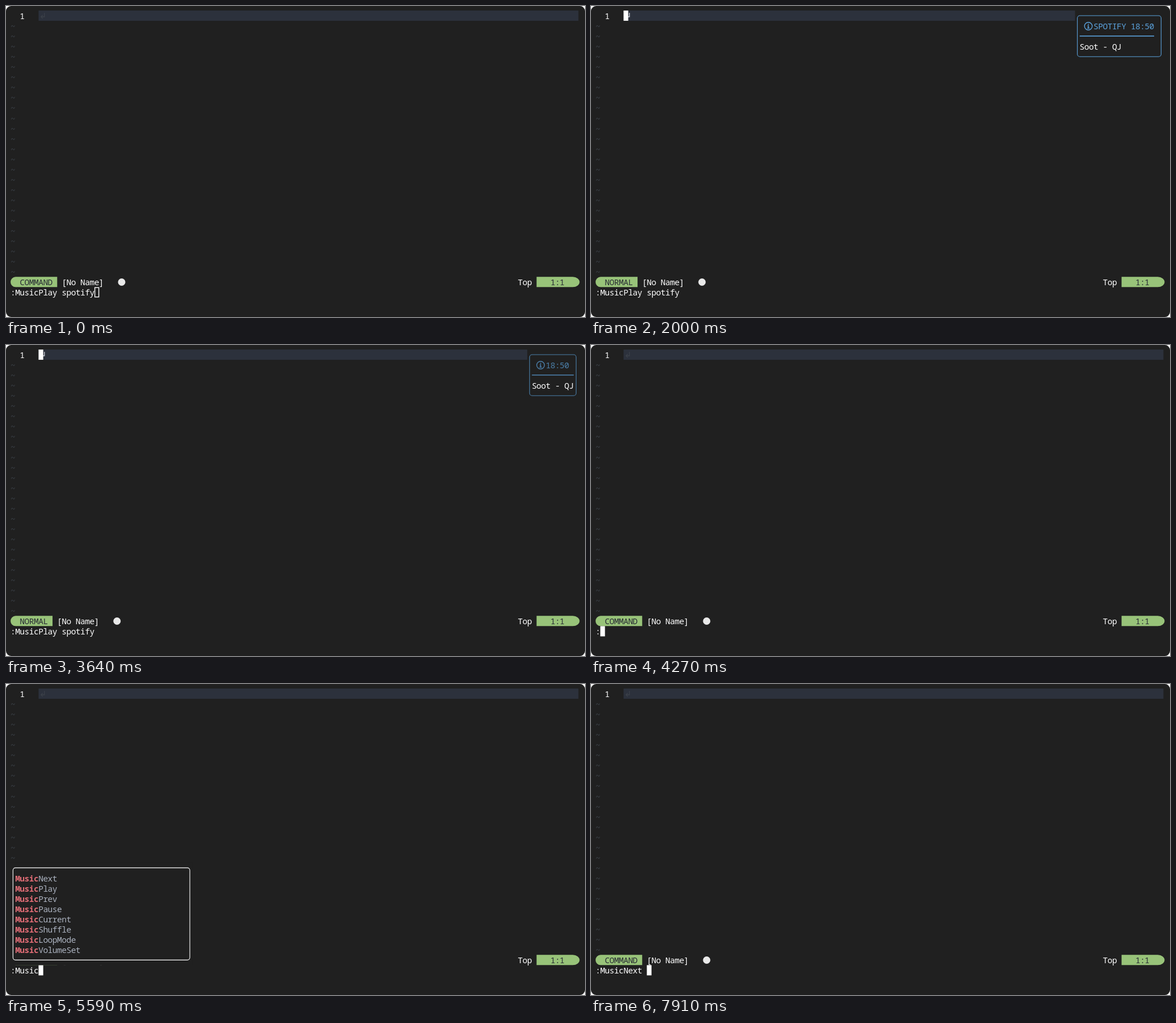
Write an HTML page that moves like this. It is 1021 px wide and 548 px high and loops after 8 s.

```html
<!DOCTYPE html>
<html lang="en">
<head>
<meta charset="utf-8">
<title>Editor music commands</title>
<style>
html, body { margin: 0; width: 100%; height: 100%; overflow: hidden; background: #fff; }
svg { display: block; width: 1021px; height: 548px; }
text { font: 14.5px "Noto Sans Mono", "DejaVu Sans Mono", monospace; letter-spacing: -.493px; white-space: pre; }
.bold { font-weight: 700; }
</style>
</head>
<body>
<svg id="screen" viewBox="0 0 1021 548"></svg>
<script>
const LOOP = 8000, CELL = 8.207, LINE = 18.05, COLS = 122;
const BG = '#202020', WHITE = '#fff', GREEN = '#98c379', BLUE = '#61afef';
const RED = '#e06c75', GREY = '#abb2bf', DIM = '#3b4048', CURSORLINE = '#2c313c';
const screen = document.getElementById('screen');

const X = col => 8.2 + col * CELL;
const Y = row => 8 + row * LINE;
const midX = col => X(col) + CELL / 2;
const midY = row => Y(row) + LINE / 2;

const text = (col, row, str, fill = WHITE, cls = '') =>
  `<text x="${X(col) - .25}" y="${Y(row) + 15}" fill="${fill}" class="${cls}">${str}</text>`;
const rect = (x, y, w, h, fill) =>
  `<rect x="${x}" y="${y}" width="${w}" height="${h}" fill="${fill}"/>`;
const cells = (col, row, w, h, fill) => rect(X(col), Y(row), w * CELL, h * LINE, fill);
const frame = (c0, r0, c1, r1, stroke) =>
  `<rect x="${midX(c0)}" y="${midY(r0)}" width="${(c1 - c0) * CELL}" height="${(r1 - r0) * LINE}"
    rx="4.5" fill="none" stroke="${stroke}" stroke-width="1.1"/>`;

// Remaining distance of a critically damped spring
const spring = (ms, omega) => {
  const z = Math.max(0, ms) / 1000 * omega;
  return (1 + z) * Math.exp(-z);
};

const MUSIC = ['MusicNext', 'MusicPlay', 'MusicPrev', 'MusicPause', 'MusicCurrent',
  'MusicShuffle', 'MusicLoopMode', 'MusicVolumeSet'];
const ALL = ['Man', 'Mason', 'MasonLog', 'MusicNext', 'MusicPlay', 'MusicPrev',
  'MatchDebug', 'MusicPause', 'MasonInstall', 'MusicCurrent'];
const PAIR = ['MusicNext', 'MusicCurrent'], SINGLE = ['MusicNext'];
const RIGHT_EDGE = { 10: 39, 8: 38, 2: 34, 1: 31 };

// start in ms, command line, completion list
const STEPS = [
  [0, 'MusicPlay spotify'],
  [4180, ''],
  [5090, 'M', ALL],
  [5320, 'Mu', MUSIC],
  [5410, 'Mus', MUSIC],
  [5500, 'Musi', MUSIC],
  [5590, 'Music', MUSIC],
  [6950, 'MusicN', PAIR],
  [7180, 'MusicNe', SINGLE],
  [7400, 'MusicNex', SINGLE],
  [7630, 'MusicNext', SINGLE],
  [7770, 'MusicNext ', SINGLE],
  [7820, 'MusicNext ']
];

function bufferLine(end, focused) {
  const x = X(6);
  return cells(6, 0, end - 6, 1, CURSORLINE) + text(2, 0, '1') +
    `<path d="M${x + 10.3} 12v7h-6m3-3l-3 3l3 3" fill="none" stroke="${focused ? '#c8ccd4' : DIM}" stroke-width="1.4"/>` +
    (focused ? cells(6, 0, 1, 1, WHITE) : '');
}

function statusLine(mode) {
  const end = mode.length + 3, y = Y(26), r = LINE / 2;
  const right = X(COLS) + 2;
  return `<path d="M${X(end)} ${y}H${8 + r}a${r} ${r} 0 0 0 0 ${LINE}H${X(end)}z
      M${X(113)} ${y}H${right - r - 3}a${r + 3} ${r} 0 0 1 0 ${LINE}H${X(113)}z" fill="${GREEN}"/>` +
    text(2, 26, mode, '#282c34') + text(end + 1, 26, '[No Name]') +
    `<circle cx="${X(end + 13) + 7}" cy="486.5" r="6.5" fill="#e8e8e8"/>` +
    text(109, 26, 'Top') + text(116, 26, '1:1', '#282c34');
}

function commandLine(typed, cursor, hollow) {
  let out = text(0, 27, ':' + typed);
  if (cursor === 0) out += cells(0, 27, 1, 1, WHITE) + text(0, 27, ':', BG);
  else if (hollow) out += `<rect x="${X(cursor) + .7}" y="${Y(27) + .8}" width="${CELL - 1.2}" height="${LINE - 1.5}"
      fill="none" stroke="${WHITE}" stroke-width="1.4"/>`;
  else if (cursor) out += cells(cursor, 27, 1, 1, WHITE);
  return out;
}

function menuItem(item, row, typed) {
  let n = 0;
  while (n < typed.length && item[n] === typed[n]) n++;
  let out = text(1, row, item.slice(0, n), RED, 'bold');
  const letter = typed.slice(n).trim().toLowerCase();
  const hit = letter ? item.toLowerCase().indexOf(letter, n) : -1;
  if (hit < 0) return out + text(1 + n, row, item.slice(n), GREY);
  return out + text(1 + n, row, item.slice(n, hit), GREY) +
    text(1 + hit, row, item[hit], BLUE, 'bold') +
    text(2 + hit, row, item.slice(hit + 1), GREY);
}

function menu(items, typed) {
  const right = RIGHT_EDGE[items.length], top = 25 - items.length;
  return rect(7, Y(top), X(right + 1) - 7, (items.length + 2) * LINE, BG) +
    frame(0, top, right, 26, WHITE) +
    items.map((item, i) => menuItem(item, top + 1 + i, typed)).join('') +
    (items.length === 10 ? cells(right, top + 1, 1, 7, GREY) : '');
}

function notice(width, alpha) {
  const left = 121 - width;
  const title = [...'   SPOTIFY'.padEnd(17)].slice(0, width);
  [...'18:50 '].forEach((ch, i) => {
    const at = width - 6 + i;
    if (at >= 0) title[at] = ch;
  });
  const cx = X(left) + 15.3, cy = 35.5;
  const icon = width < 3 ? '' :
    `<circle cx="${cx}" cy="${cy}" r="6.8" fill="none" stroke="${BLUE}" stroke-width="1.4"/>
     <path d="M${cx} ${cy - 4}v2M${cx - 1.5} ${cy - .5}h1.5v4m-2 0h4" fill="none" stroke="${BLUE}" stroke-width="1.5"/>`;
  return `<g opacity="${alpha.toFixed(3)}">` + frame(left - 1, 0, 121, 4, BLUE) + icon +
    text(left, 1, title.join(''), BLUE) +
    rect(X(left), midY(2) - 1, Math.min(16, width) * CELL, 1.6, BLUE) + '</g>' +
    text(left, 3, 'Soot - QJ'.slice(0, width));
}

function draw(t) {
  const [, typed, items] = STEPS.findLast(step => step[0] <= t);
  const normal = t >= 1410 && t < 4180;
  const width = Math.round(1 + 16 * spring(t - 3533, 15.7));
  const shown = t >= 1410 && t < 3950 && width > 1;
  const alpha = (1 - spring(t - 1360, 2 * Math.PI)) * spring(t - 3533, 11);
  const cursor = normal ? null : t >= 950 && t < 1410 ? 0 : typed.length + 1;

  let out = `<rect width="1021" height="548" rx="9" fill="${BG}"/>`;
  out += bufferLine(shown ? 120 - width : COLS, normal);
  for (let row = 1; row < 26; row++) out += text(0, row, '~', DIM);
  out += statusLine(normal ? 'NORMAL' : 'COMMAND');
  out += commandLine(typed, cursor, t < 50);
  if (items) out += menu(items, typed);
  if (shown) out += notice(width, alpha);
  return out;
}

const start = performance.now();
let last = '';
function tick() {
  const next = draw((performance.now() - start) % LOOP);
  if (next !== last) screen.innerHTML = last = next;
  requestAnimationFrame(tick);
}
tick();
</script>
</body>
</html>
```
